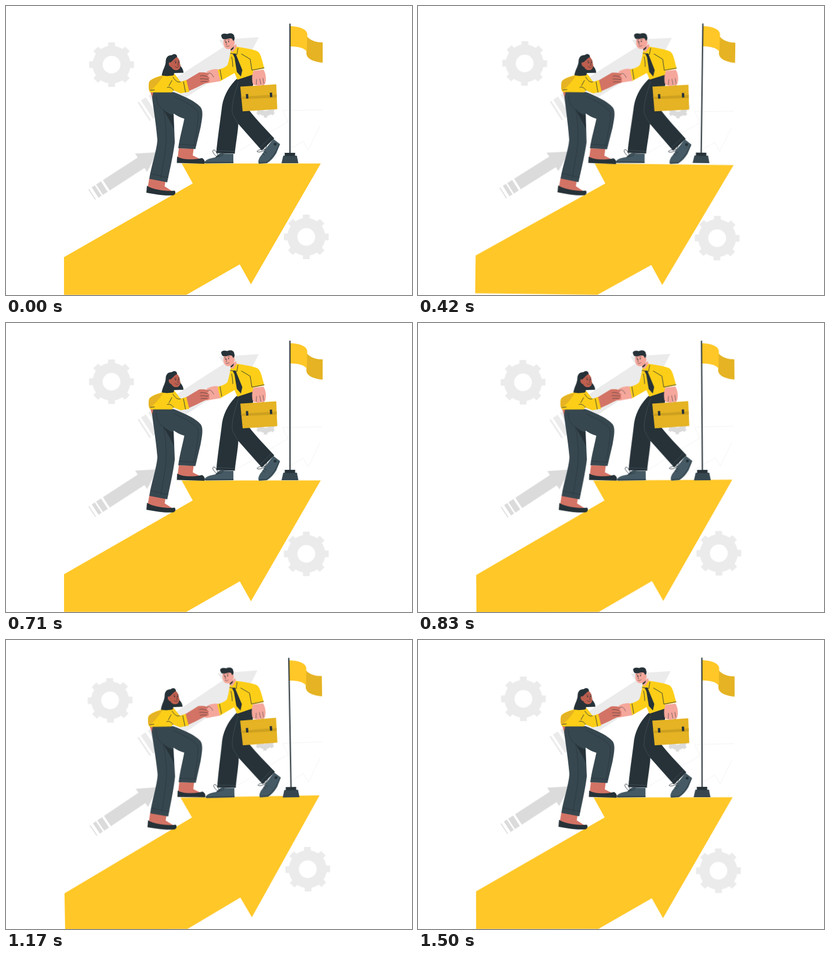
Animation, 700 px wide and 500 px high, one loop 1.54 s. Source, as an HTML page:

```html
<!DOCTYPE html>
<html lang="en">
<head>
<meta charset="utf-8">
<title>Helping hand</title>
<style>
html, body { margin: 0; width: 100%; height: 100%; overflow: hidden; background: #fff; }
svg { display: block; width: 700px; height: 500px; }
.dark { fill: #263238; }
.slate { fill: #37474f; }
.shoe { fill: #455a64; }
.gold { fill: #ffc727; }
.shirt { fill: #fcce17; }
.shade { fill: #e5b323; }
.pink { fill: #f5a79b; }
.tan { fill: #d37365; }
.face { fill: #be5f4f; }
.ln { fill: none; stroke: #263238; stroke-width: .9; stroke-linecap: round; stroke-linejoin: round; }
.thin { stroke-width: .6; }
.seam { fill: none; stroke: #263238; stroke-width: .6; }
.seam2 { fill: none; stroke: #53636b; stroke-width: .5; }
</style>
</head>
<body>
<svg viewBox="0 0 700 500">
  <defs>
    <g id="gear">
      <circle r="24" fill="none" stroke="currentColor" stroke-width="17.4"/>
      <g id="teeth" fill="currentColor"></g>
    </g>
  </defs>

  <g data-pivot="350 250" color="#ebebeb">
    <use href="#gear" x="182" y="101.5"/>
    <use href="#gear" x="517.7" y="399.5"/>
    <use href="#gear" color="#dbdbdb" transform="translate(447.5 173.500) scale(.51)"/>
  </g>

  <g data-pivot="349 195">
    <path fill="#ebebeb" transform="translate(436 54) rotate(-33)"
      d="M0 0L-60-34V-19H-193V19H-60V34ZM-215-19h17v38h-17zM-230-19h10v38h-10zM-237-19h3v38h-3z"/>
    <path fill="#dbdbdb" transform="translate(261 253) rotate(-33)"
      d="M0 0L-33.5-19V-10.7H-105V10.7H-33.5V19ZM-119-10.7h10v21.4h-10zM-128-10.7h6.3v21.4h-6.3zM-135-10.7h1.6v21.4h-1.6z"/>
    <path fill="none" stroke="#f0f0f0" stroke-width=".8" d="M398 253L486 200L477 181L545 179.700M541 208L521 249L512 234L458 266"/>
  </g>

  <path data-pivot="321.5 386" class="gold" d="M303 272.500H542.700L422.300 481.500L403 447L311 499.700H100V434.500L322 307Z"/>

  <g data-pivot="510 151.5">
    <path class="shade" d="M518.500 52C524 60 536 63 546 63V98C533 97 517 92 518 81Z"/>
    <path class="gold" d="M490 35C503 35 519 39 519.500 49L518.600 79C514 72 503 70 490 70Z"/>
    <path fill="none" stroke="#263238" stroke-width="2.1" d="M489.600 30.500V256"/>
    <path class="slate" d="M478 259H501.500L504 272H475Z"/>
    <path class="dark" d="M480.500 254H498.500V259.500H480.500Z"/>
  </g>

  <g data-pivot="408 160">
    <path class="pink" d="M368 110C359 108 350 111 346 114L341 128C341 133 347 135 352 133L370 130Z"/>
    <path class="shoe" d="M342 271C343 266 352 263 361 262C364 258 368 255 370 255L392 256V272L344 272.500Z"/>
    <path class="ln" d="M343 270.500H392M364 261C357 256 354 249 359 249C363 251 365 257 366 260C370 255 375 253 374 257C373 260 367 260 361 262"/>
    <path class="shoe" d="M461 230L472.500 239L466 255C462 262 456 268 450 272L436 273C433 268 438 260 442 256L447 248Z"/>
    <path class="ln" d="M437 271L449 270.500C460 263 466 252 471 240M447 248C440 247 432 250 433 252C437 254 443 251 446 249C449 244 451 240 448 241M442 255L446 258M444 251L449 254"/>
    <circle class="dark" cx="464" cy="239" r="2.5"/>
    <path class="dark" d="M399 125C387 136 376 152 372.500 173C370 195 364.500 230 362.500 254.500L394.500 255.500C396 238 400 218 400.500 204L441 250L462.500 229C447 212 431 196 419 180L429 117Z"/>
    <path class="seam2" d="M401 131C394 152 389 170 390 184C393 194 398 199 400.500 204M363 250L394 251.500M437 246L458 225"/>
    <path class="pink" d="M386 72L397 66L399 78L391 83L387 77Z"/>
    <path class="shirt" d="M388 77L391 80L398 70.500C410 72.500 428 75 434.500 79C440 83 442 97 445.500 108L426 112L428 118L399 127.500L394 116L369.500 130L365 110.500C374 108 380 105 382 102C384 96 386 86 387 80Z"/>
    <path class="ln" d="M369 110L372 127M406 83L421 92L424 111L445 107M387 82L393 83L398 84L400 73M391 105C391 98 390 92 389 88"/>
    <path class="dark" d="M391 83L395.500 82L397 85L407.500 111L405 122L398 114L394 89Z"/>
    <path class="pink" d="M376 56C374 62 374.500 69.500 379 73.500C385 77 392 72 394.500 64L392.500 54Z"/>
    <path class="dark" d="M371.500 53C369.500 48.500 376 46.500 381.500 48.500C387 45.500 394 48 393.500 53C395 55 394 59.500 392 60.500L389.500 56.500C386 54.500 381 58 376 57.500C374 57.500 372 56 371.500 53ZM387 75L393 70L392 74L388 77Z"/>
    <ellipse class="dark" cx="378.800" cy="62.300" rx=".8" ry="1.300"/>
    <ellipse class="dark" cx="383.800" cy="61.500" rx=".8" ry="1.300"/>
    <path class="ln thin" d="M376.500 60L379 59.300M382.500 58.500L385.500 58.300M380.500 62.500L379.500 66.500L381 66.800M379.500 69.500C381.500 70.500 383.500 70 385 68.500"/>
    <path fill="none" stroke="#263238" stroke-width="2" d="M435.500 138V134H443L443.500 138"/>
    <path class="shade" d="M404 139.400L466 135.500L467.700 178.500L408 182.300Z"/>
    <path fill="#cda01f" d="M405.300 157L466.700 153V158.500L406 161Z"/>
    <path class="dark" d="M413.500 152.500L417.500 152.200L418 160L414 160.300ZM454.700 150L458.700 149.700L459.200 157.500L455.200 157.800Z"/>
    <path class="pink" d="M427 112L444 110C449 118 449 130 446.500 135C443 138 441 137 439.500 136C437 139 433 139 431.500 136.500C428 138 426 136 425 133C424 125 424 118 427 112Z"/>
    <path class="ln thin" d="M431.500 136L432 127M439.500 136L437.500 126M444.500 134L443 125"/>
  </g>

  <g data-pivot="297 206">
    <path class="tan" d="M249 149L256 149L253 162Z"/>
    <path class="tan" d="M247 298L275 303L273.500 312L286 320L262 320L244.500 313ZM298 246L323.500 247L322 258.500L335 265L310 268L296 262Z"/>
    <path class="dark" d="M243 311C253 318 276 321 291 319.500C293 323 292 326 289 327.500C270 329 255 325 242 323ZM295 260.500C306 267 325 266 338 263C342 265 344 270 342 273L294.500 271.500Z"/>
    <path class="slate" d="M254 149L289 149C306 155.500 327 165 335.500 175C341 182 338 196 335.500 210L326.500 247.500L297 246C299 230 304 212 307.500 195C300 193 295 190 289 186L291 236C288 260 282 285 278 305L247 299C250 278 260 250 261 232C259 205 253 170 252 158Z"/>
    <path class="dark" d="M271 178C276 184 282 187 288.500 189L289.500 213C284 200 277 190 271 178Z"/>
    <path class="seam" d="M259 155C259 166 264 174 272 181C275 200 277 220 276 237C274 260 270 276 267 298M290 157C310 166 326 175 331 184C333 196 327 222 324 241M298 239L328 241M249 290L280 297"/>
    <path class="tan" d="M308 130L333 115C341 114 348 115 350 118.500L346 121C352 123 352 126 349 126.500C353 129 350 133 346 133C337 136 328 142 313 148Z"/>
    <path class="ln thin" d="M335 121C339 119 345 122 348 122M335 126C340 125 345 127 349 126.500M336 131C340 130 344 131 347 130.500M348 117C353 114 355 118 358 123"/>
    <path class="shirt" d="M272 119C262 122 250 126 247 131C245 138 246 146 249 149.500H286L289 146L301 151L316 148.500L311 128L301 131C297 126 294 121 290 117Z"/>
    <path class="shade" d="M271 121C263 122 250 126 247 131C245.500 137 245.500 143 247.500 148C257 140 265 131 271 121Z"/>
    <path class="ln" d="M301 131C296 134 290 127 288 123M289 146C286 142 282 139 278 141M281 138L286 129M306 131L309.500 149M249 146L256 145"/>
    <path class="dark" d="M295 88C295 82.500 289 82 286 85C279 85 276 89 275.500 95C275.500 104 270 110 268.500 120C275 122 283 121 289 120L290 116L306 115.500C306 109 302 106 300 102Z"/>
    <path class="face" d="M282 97C284 100 288 92 294.500 88.500C299 91 299.500 96 300.500 101C301.500 106 299 110 295 111C290 111.500 286.500 109 285.500 106C280.500 105 279.500 98 282 97Z"/>
    <ellipse class="dark" cx="292.500" cy="98" rx=".9" ry="1.300"/>
    <ellipse class="dark" cx="298" cy="97.500" rx=".8" ry="1.300"/>
    <path class="ln thin" d="M290.500 95.500L293.500 95M296.500 94.700L299 95M296 98L297.500 102.500L295.500 102.500M291.500 104.500C293.500 107 296.500 106.500 298 105"/>
  </g>
</svg>
<script>
const teeth = document.getElementById('teeth');
for (let i = 0; i < 8; i++) {
  const tooth = document.createElementNS('http://www.w3.org/2000/svg', 'path');
  tooth.setAttribute('d', 'M-6-30L-5.700-38.600H5.700L6-30Z');
  tooth.setAttribute('transform', `rotate(${i * 45})`);
  teeth.append(tooth);
}

// Each group sways about its own middle, at 37 steps per loop.
const sway = [[0, 0], [.223, .93], [.723, -1.13], [1, 0]];
const timing = { duration: 1540, delay: -4, iterations: Infinity, easing: 'steps(37)' };
for (const part of document.querySelectorAll('[data-pivot]')) {
  const [x, y] = part.dataset.pivot.split(' ');
  part.style.transformOrigin = `${x}px ${y}px`;
  part.animate(sway.map(([offset, deg]) => ({ offset, transform: `rotate(${deg}deg)` })), timing);
}
</script>
</body>
</html>
```
